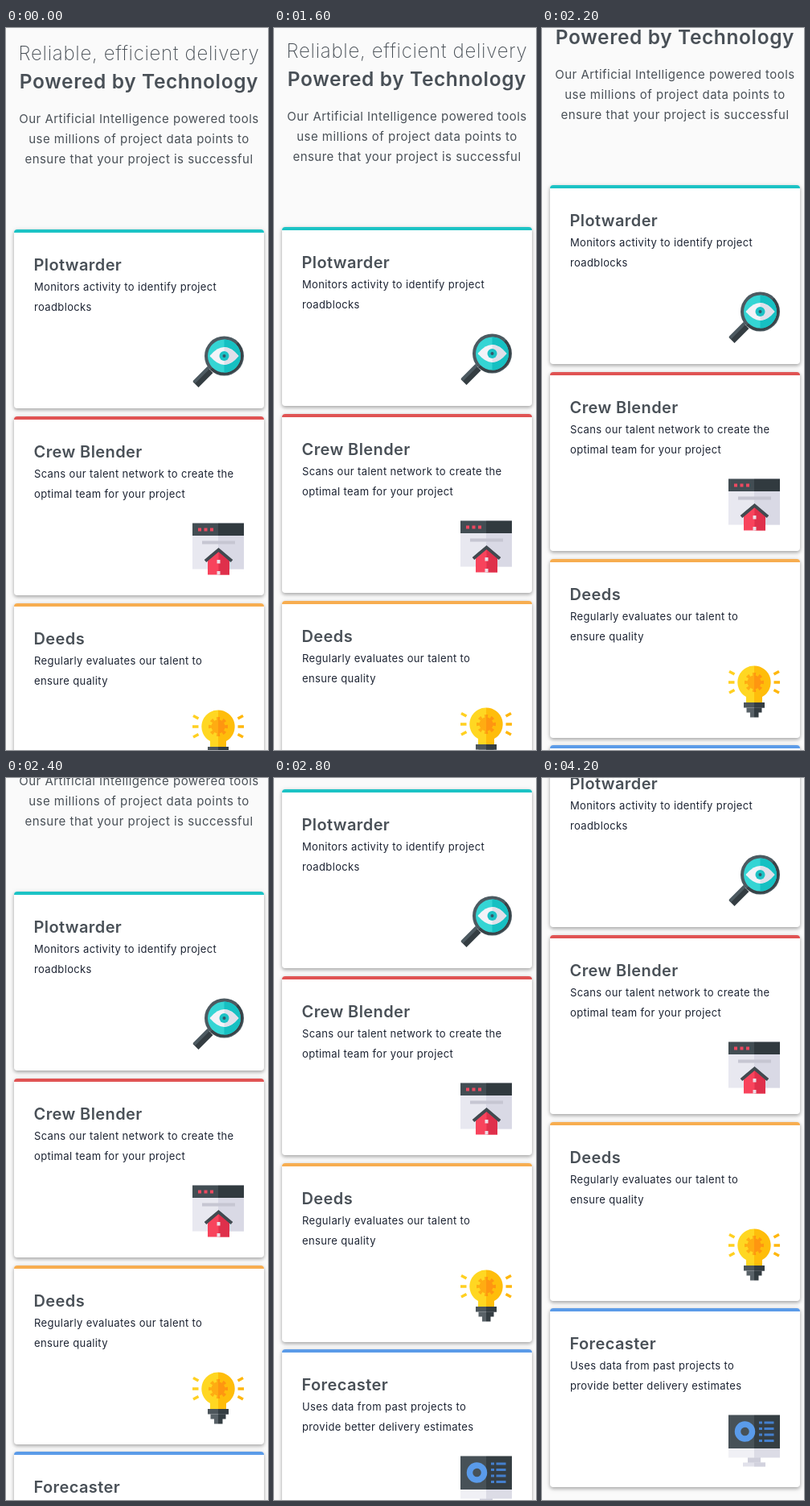
Animation of 326x896 px, one loop 4.8 s. Source, as an HTML page:

```html
<!DOCTYPE html>
<html lang="en">
<head>
<meta charset="utf-8">
<title>Scrolling cards</title>
<style>
  html, body { margin: 0; width: 100%; height: 100%; overflow: hidden; background: #fafafa; }
  svg { display: block; }
  text { font-family: Inter, "Open Sans", sans-serif; }
  .head { text-anchor: middle; fill: #495057; }
  .thin { font-size: 24px; font-weight: 200; letter-spacing: .03em; }
  .bold { font-size: 24.5px; font-weight: 600; letter-spacing: .025em; }
  .lead { font-size: 15px; letter-spacing: .032em; }
  .title { font-size: 20px; font-weight: 600; letter-spacing: .02em; fill: #495057; }
  .desc { font-size: 13px; letter-spacing: .028em; fill: #1d2433; }
  .card { fill: #fff; filter: drop-shadow(0 2px 2px rgba(0, 0, 0, .28)) drop-shadow(0 1px 3px rgba(0, 0, 0, .1)); }
</style>
</head>
<body>
<svg width="326" height="896" viewBox="0 0 326 896">
  <defs>
    <clipPath id="cardShape"><rect width="311" height="222" rx="4"/></clipPath>
    <clipPath id="rightHalf"><rect x="32" width="32" height="64"/></clipPath>

    <g id="lens">
      <path d="M4 60 22 42" stroke="#343d42" stroke-width="10"/>
      <path d="M2 57 20 39" stroke="#4d5a61" stroke-width="4"/>
      <circle cx="39.5" cy="24.5" r="24.5" fill="#4d5a61"/>
      <path d="M22.2 41.8A24.5 24.5 0 0 0 56.8 7.2Z" fill="#394348"/>
      <circle cx="39.5" cy="24.5" r="20.5" fill="#35d5d4"/>
      <path d="M39.5 4a20.5 20.5 0 0 1 0 41Z" fill="#16c0c2"/>
      <path d="M21.5 24.5Q39.5 2.500 57.5 24.5Q39.5 46.500 21.5 24.5Z" fill="#f3f3f8"/>
      <path d="M39.5 13.5Q48.5 13.5 57.5 24.5Q48.5 35.5 39.5 35.5Z" fill="#e0e0ea"/>
      <circle cx="39.5" cy="24.5" r="6" fill="#1cc2c5"/>
      <circle cx="39.5" cy="24.5" r="2" fill="#34566a"/>
    </g>

    <g id="house">
      <path d="M0 0H64V57H0Z" fill="#e8e8f0"/>
      <path d="M32 0H64V57H32Z" fill="#d9d9e5"/>
      <path d="M0 0H32V15.5H0Z" fill="#424d53"/>
      <path d="M32 0H64V15.5H32Z" fill="#313a3f"/>
      <path d="M7 6h4v4h-4zM14.5 6h4v4h-4zM22 6h4v4h-4z" fill="#ee4960"/>
      <path d="M12 22H53V26H12Z" fill="#c6c6d2"/>
      <path d="M19 64V45L32.5 33 46 45V64Z" fill="#f8435c"/>
      <path d="M32.5 33 46 45V64H32.5Z" fill="#df304b"/>
      <path d="M16 47 32.5 33 49 47" fill="none" stroke="#414a50" stroke-width="4"/>
      <path d="M30.500 45.5h4v4.5h-4zM30.500 59.5h4v4.5h-4z" fill="#ecdfe7"/>
    </g>

    <g id="gear">
      <circle cx="32" cy="20.5" r="8.5"/>
      <circle cx="32" cy="20.5" r="10" fill="none" stroke="currentColor" stroke-width="4"
        pathLength="16" stroke-dasharray="1" stroke-dashoffset=".5"/>
    </g>

    <g id="bulb">
      <path d="M1 7 7.5 10.5M0 20.5H7.5M1 33.5 7.5 30" stroke="#ffd021" stroke-width="3.5"/>
      <path d="M63 7 56.5 10.5M64 20.5H56.5M63 33.5 56.5 30" stroke="#ffb70d" stroke-width="3.5"/>
      <path d="M32 0A20.5 20.5 0 0 0 22 38.5V46H32Z" fill="#ffd722"/>
      <path d="M32 0A20.5 20.5 0 0 1 42 38.5V46H32Z" fill="#ffbd0b"/>
      <use href="#gear" fill="#ffac12" color="#ffac12"/>
      <g clip-path="url(#rightHalf)"><use href="#gear" fill="#ff9610" color="#ff9610"/></g>
      <path d="M19 45.5H45V52H19Z" fill="#4d565c"/>
      <path d="M32 45.5H45V52H32Z" fill="#343d42"/>
      <path d="M22.5 52H32V64H27V58H22.5Z" fill="#596268"/>
      <path d="M32 52H41.5V58H37.5V64H32Z" fill="#343d42"/>
    </g>

    <g id="screen">
      <path d="M24 52H40V60H24Z" fill="#cfcfdb"/>
      <path d="M18 59H46V64H18Z" fill="#e2e2eb"/>
      <path d="M32 59H46V64H32Z" fill="#d2d2de"/>
      <path d="M0 41H32V53H0Z" fill="#f0f0f5"/>
      <path d="M32 41H64V53H32Z" fill="#dcdce6"/>
      <path d="M0 0H32V41.5H0Z" fill="#475157"/>
      <path d="M32 0H64V41.5H32Z" fill="#353e43"/>
      <circle cx="20.5" cy="20.5" r="9" fill="none" stroke="#5a9bea" stroke-width="7.5"/>
      <path d="M38 9.5h4m2.5 0h12M38 17h4m2.5 0h12M38 24.5h4m2.5 0h12M38 32h4m2.5 0h12"
        stroke="#447fcd" stroke-width="3"/>
    </g>
  </defs>

  <rect width="326" height="896" fill="#fafafa"/>
  <g id="page">
    <text class="head thin" x="165.5" y="40">Reliable, efficient delivery</text>
    <text class="head bold" x="165.5" y="75">Powered by Technology</text>
    <text class="head lead" x="165.5" y="118">Our Artificial Intelligence powered tools</text>
    <text class="head lead" x="165.5" y="143">use millions of project data points to</text>
    <text class="head lead" x="165.5" y="168">ensure that your project is successful</text>
  </g>
</svg>
<script>
const page = document.getElementById('page');

const cards = [
  ['Plotwarder', 'Monitors activity to identify project', 'roadblocks', '#1cc3c5', 'lens'],
  ['Crew Blender', 'Scans our talent network to create the', 'optimal team for your project', '#e05353', 'house'],
  ['Deeds', 'Regularly evaluates our talent to', 'ensure quality', '#f7ad50', 'bulb'],
  ['Forecaster', 'Uses data from past projects to', 'provide better delivery estimates', '#5b9be8', 'screen'],
];

page.innerHTML += cards.map(([title, line1, line2, color, icon], i) => `
  <g transform="translate(10 ${Math.round(250 + i * 231.75)})">
    <rect class="card" width="311" height="222" rx="4"/>
    <rect width="311" height="4" fill="${color}" clip-path="url(#cardShape)"/>
    <text class="title" x="24.5" y="51">${title}</text>
    <text class="desc" x="25" y="76">${line1}</text>
    <text class="desc" x="25" y="101">${line2}</text>
    <use href="#${icon}" x="222" y="132.5"/>
  </g>`).join('');

// Scroll keys: time in ms, offset in px, speed in px per 100 ms
const keys = [
  [1500, 0, 0], [1600, 3, 3], [2000, 24, 10], [2400, 109, 32],
  [2800, 236, 25], [3100, 286, 0], [3300, 287, 0],
];
const LOOP = 4800, STEP = 100;

function scrollAt(time) {
  if (time <= keys[0][0]) return 0;
  const next = keys.findIndex(key => key[0] >= time);
  if (next < 0) return keys[keys.length - 1][1];
  const [t0, y0, v0] = keys[next - 1], [t1, y1, v1] = keys[next];
  const u = (time - t0) / (t1 - t0), span = (t1 - t0) / 100;
  const ease = u * u * (3 - 2 * u);
  return y0 + (y1 - y0) * ease
    + span * u * (1 - u) * (v0 * (1 - u) - v1 * u);
}

function draw() {
  const time = Math.floor(performance.now() % LOOP / STEP) * STEP;
  page.setAttribute('transform', `translate(0 ${-Math.floor(scrollAt(time))})`);
  requestAnimationFrame(draw);
}
draw();
</script>
</body>
</html>
```
